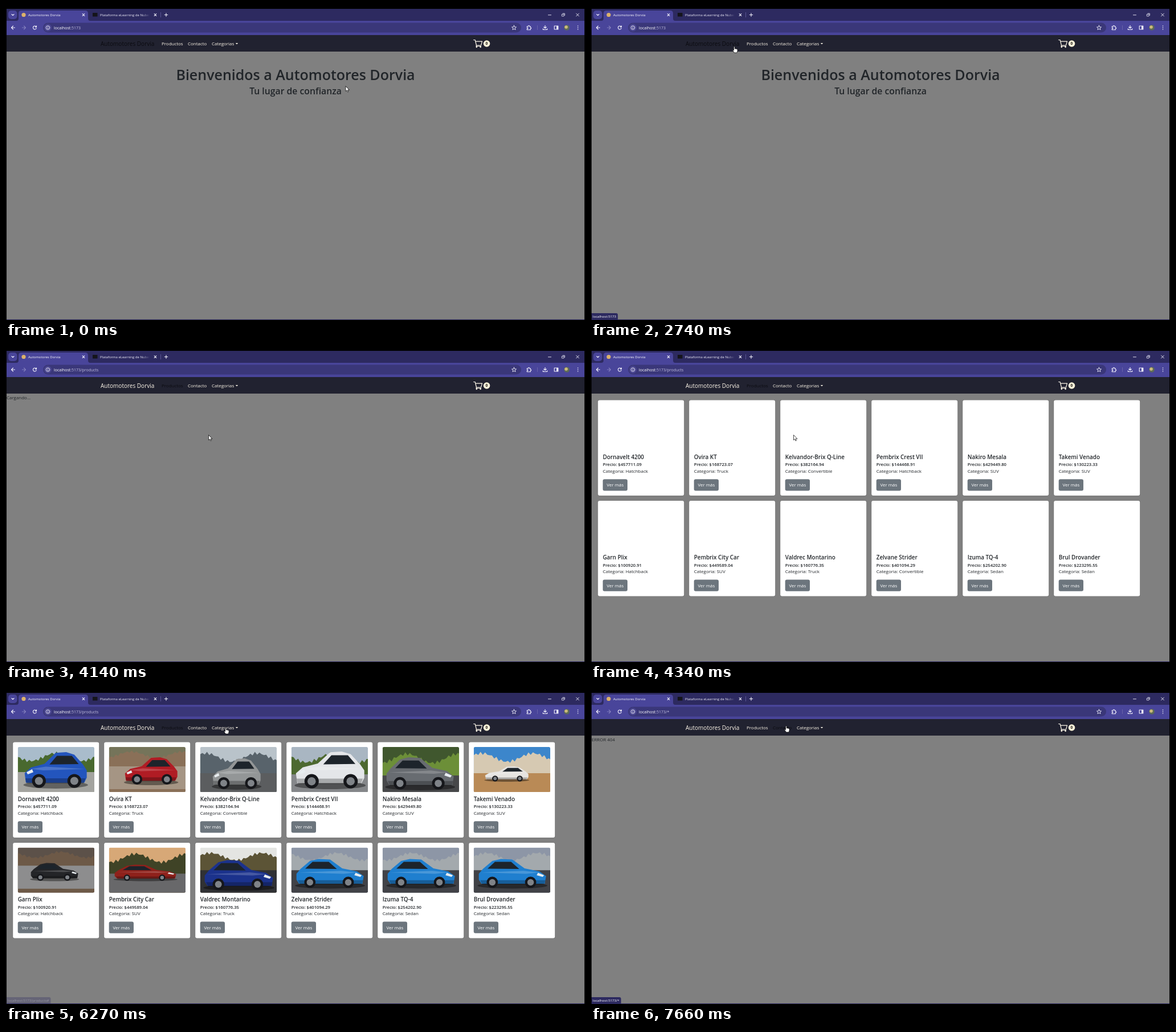
An HTML page with a canvas for the animation above (8 s loop, 1016 by 551 pixels).

```html
<!DOCTYPE html>
<html lang="es">
<head>
<meta charset="utf-8">
<style>
  html, body { margin: 0; width: 100%; height: 100%; overflow: hidden; background: #000; }
  canvas { display: block; }
</style>
</head>
<body>
<canvas id="stage" width="1016" height="551"></canvas>
<script>
const ctx = document.getElementById('stage').getContext('2d');
const LOOP = 8000, TICK = 200 / 3;
const BRAND = 'Automotores Dorvia';
const CREAM = '#fdf6e8', DARK = '#0b0b10', INK = '#212529', PURPLE = '#49459a', STRIP = '#2d2a60';

// name, price, category
const cars = [
  ['Dornavelt 4200', '457711.09', 'Hatchback'],
  ['Ovira KT', '168723.07', 'Truck'],
  ['Kelvandor-Brix Q-Line', '382164.94', 'Convertible'],
  ['Pembrix Crest VII', '144468.91', 'Hatchback'],
  ['Nakiro Mesala', '429449.80', 'SUV'],
  ['Takemi Venado', '130223.33', 'SUV'],
  ['Garn Plix', '100920.91', 'Hatchback'],
  ['Pembrix City Car', '449589.04', 'SUV'],
  ['Valdrec Montarino', '160776.35', 'Truck'],
  ['Zelvane Strider', '401094.29', 'Convertible'],
  ['Izuma TQ-4', '254202.90', 'Sedan'],
  ['Brul Drovander', '223295.55', 'Sedan']
];

// sky, backdrop, ground, body, left, top, width, height, horizon, facing
const photos = [
  ['#a9bccb', '#49692f', '#a3a39f', '#2355bd', 12, 9, 109, 64, 44, -1],
  ['#75745a', '#8a7058', '#a59584', '#b01c24', 28, 18, 92, 49, 34, -1],
  ['#b9c3ca', '#58636b', '#5b5d5f', '#939697', 22, 20, 84, 55, 46, -1],
  ['#a9b6c2', '#4d6930', '#85878a', '#e4e6e9', 8, 8, 120, 66, 48, -1],
  ['#40572e', '#6c8f38', '#47484a', '#686c71', 7, 18, 118, 58, 50, 1],
  ['#3c86cb', '#d6c9b2', '#b98a56', '#e6e4e1', 20, 34, 76, 27, 46, -1],
  ['#5c5149', '#6d5947', '#8d8d8e', '#242528', 23, 27, 83, 32, 32, 1],
  ['#d7a877', '#3f4326', '#68686a', '#8f211b', 10, 30, 108, 29, 46, 1],
  ['#e4e5e2', '#5c5436', '#303134', '#1b328c', 8, 22, 120, 54, 40, 1],
  ['#8d96a6', '#a3a9ad', '#414247', '#1f7fcf', 9, 20, 118, 52, 40, 1]
];

// tick, x, y of the pointer tip
const track = [
  [1, 596, 141], [4, 562, 166], [7, 450, 176], [11, 275, 112], [14, 213, 77], [16, 206, 63],
  [31, 206, 63], [36, 235, 74], [40, 235, 74], [41, 251.5, 71], [46, 290, 67],
  [53, 290, 67], [56, 310, 100], [60, 350, 148], [62, 355.5, 153],
  [80, 355.5, 153], [84, 362, 132], [89, 381, 78], [92, 385.5, 66],
  [103, 385.5, 66], [108, 342.5, 63], [120, 342.5, 63]
];

function box(x, y, w, h, color, r = 0) {
  ctx.fillStyle = color;
  ctx.beginPath();
  ctx.roundRect(x, y, w, h, r);
  ctx.fill();
}

function disc(x, y, r, color) {
  ctx.fillStyle = color;
  ctx.beginPath();
  ctx.arc(x, y, r, 0, 7);
  ctx.fill();
}

function text(str, x, y, size, color, weight = 400, align = 'left') {
  ctx.font = `${weight} ${size}px "Open Sans", "Noto Sans", sans-serif`;
  ctx.textAlign = align;
  ctx.fillStyle = color;
  ctx.fillText(str, x, y);
  return ctx.measureText(str).width;
}

function shape(d, x, y, fill, stroke, width = 1) {
  const path = new Path2D(d);
  ctx.save();
  ctx.translate(x, y);
  ctx.lineCap = ctx.lineJoin = 'round';
  ctx.lineWidth = width;
  if (fill) { ctx.fillStyle = fill; ctx.fill(path); }
  if (stroke) { ctx.strokeStyle = stroke; ctx.stroke(path); }
  ctx.restore();
}

const icon = (d, x, y, width = 1.1, color = '#f2f1fc') => shape(d, x, y, null, color, width);

function drawBrowser(path) {
  box(0, 0, 1016, 551, '#000');
  box(1, 5, 1014, 22, STRIP);
  box(1, 26, 1014, 25, PURPLE);
  box(4, 8, 15.5, 15, PURPLE, 5);
  icon('M-2-1L0 1 2-1', 12, 15.5);
  shape('M-4 18Q0 18 0 14V5Q0 0 5 0H117Q122 0 122 5V14Q122 18 126 18Z', 22, 8, PURPLE);

  disc(31, 15.5, 3.6, '#dcb26a');
  text(BRAND, 39, 17.8, 6, '#fff');
  box(152, 12, 8.5, 6.5, '#15151b');
  const fade = ctx.createLinearGradient(238, 0, 252, 0);
  fade.addColorStop(0, '#f0effa');
  fade.addColorStop(1, '#f0effa00');
  text('Plataforma eLearning de Nubel', 165, 17.8, 6, fade);
  for (const x of [136, 262]) icon('M-1.8-1.8L1.8 1.8M1.8-1.8L-1.8 1.8', x, 15.5);
  box(271, 11, 0.8, 9, '#6561a0');
  icon('M-2.7 0H2.7M0-2.7V2.7', 281, 15.5);

  icon('M-2.5 0H2.5', 954, 15.8, 0.9);
  icon('M-2.3-1H1V2.3H-2.3ZM-1-2.4H2.4V1', 978, 15.5, 0.8);
  icon('M-2.4-2.4L2.4 2.4M2.4-2.4L-2.4 2.4', 1003, 15.5, 0.9);

  icon('M3 0H-3M0-3L-3 0 0 3', 12.5, 38);
  icon('M-3 0H3M0-3L3 0 0 3', 31.5, 38, 1.1, '#827fbd');
  icon('M2.6-1.5A3 3 0 1 0 2.8 1M3-3.3V-1.1H.8', 50.5, 38);
  box(65, 29.5, 839, 17, '#3a3779', 8.5);
  disc(73.5, 38, 6.5, '#4a4690');
  icon('M3.3 0A3.3 3.3 0 1 1-3.3 0A3.3 3.3 0 1 1 3.3 0M0 0V1.6M0-1.6V-1.5', 73.5, 38, 0.9);
  const hostWidth = text('localhost', 84, 40.6, 6.97, '#fff');
  text(':5173' + path, 84 + hostWidth, 40.6, 6.97, '#c0bedf');

  icon('M0-3.9L1.1-1.2 4-1 1.8.9 2.5 3.7 0 2.2-2.5 3.7-1.8.9-4-1-1.1-1.2Z', 891.5, 38, 0.9);
  icon('M-3.2-2.2H-1Q-1-3.8 0-3.8T1-2.2H2.8V-.2Q4.2-.2 4.2.8T2.8 1.8V3.8H-3.2V1.8Q-1.6 1.8-1.6.8T-3.2-.2Z', 917.5, 38);
  box(932, 34, 0.8, 8, '#716dae');
  icon('M0-3.6V1M-2.2-1L0 1.2 2.2-1M-3.6 1.8V3.5H3.6V1.8', 946, 38, 1.2);
  icon('M-3.3-3H3.3V3H-3.3Z', 965.5, 38);
  box(966, 35, 3, 6, '#f2f1fc');
  disc(984, 38, 4.8, '#5d6b58');
  disc(983, 37, 2.8, '#cdbb7c');
  for (const dy of [-3, 0, 3]) disc(1003.5, 38 + dy, 0.8, '#f2f1fc');
}

function drawNav(active) {
  box(1, 51, 1014, 29.5, '#212230');
  const tint = on => on ? DARK : CREAM;
  text(BRAND, 166, 69.7, 10, tint(active.home));
  text('Productos', 273, 68.7, 7.95, tint(active.products));
  text('Contacto', 319, 68.7, 7.95, tint(active.contact));
  text('Categorias', 361, 68.7, 7.95, CREAM);
  shape('M0 0H4.4L2.2 2.3Z', 402.8, 65, CREAM);
  icon('M0 0H2.6L5 9.5H13L15 2.6H3.2M5 9.5L4.5 11H13', 820.5, 59.5, 1.2, CREAM);
  for (const x of [825.8, 832.6]) disc(x, 72, 1.3, CREAM);
  disc(843.5, 66, 5.8, '#fff5d9');
  text('0', 843.5, 68.4, 6.6, '#111', 700, 'center');
}

function drawCar(body, x, y, w, h, facing) {
  ctx.save();
  ctx.translate(x + w / 2, y);
  ctx.scale(facing, 1);
  ctx.translate(-w / 2, 0);
  const poly = (color, ...p) => {
    ctx.fillStyle = color;
    ctx.beginPath();
    p.forEach(([u, v]) => ctx.lineTo(u * w, v * h));
    ctx.fill();
  };
  ctx.fillStyle = '#0006';
  ctx.beginPath();
  ctx.ellipse(w / 2, h * .9, w * .52, h * .1, 0, 0, 7);
  ctx.fill();
  poly(body, [0, .5], [.06, .34], [.2, .07], [.33, 0], [.5, .02], [.68, .32], [.9, .42],
    [1, .58], [.98, .84], [.04, .84], [0, .7]);
  poly('#1d242b', [.13, .33], [.24, .1], [.48, .1], [.6, .34]);
  poly('#ffffff30', [.03, .46], [.66, .4], [.9, .46], [.7, .5]);
  poly('#0004', [.02, .72], [.99, .72], [.97, .86], [.05, .86]);
  poly('#e8edf0', [.88, .47], [.97, .55], [.95, .61], [.86, .55]);
  for (const u of [.2, .77]) {
    disc(u * w, h * .79, h * .19, '#15161a');
    disc(u * w, h * .79, h * .11, '#7f8388');
  }
  ctx.restore();
}

function drawPhoto(index, x, y) {
  const [sky, back, ground, body, cx, cy, cw, ch, horizon, facing] = photos[Math.min(index, 9)];
  ctx.save();
  ctx.beginPath();
  ctx.roundRect(x, y, 134.3, 79, 2.5);
  ctx.clip();
  ctx.translate(x, y);
  box(0, 0, 135, 80, sky);
  ctx.fillStyle = back;
  ctx.beginPath();
  ctx.moveTo(0, 80);
  for (let u = 0; u <= 136; u += 4)
    ctx.lineTo(u, horizon * (.4 + .16 * Math.sin(u * .07 + index * 2) + .06 * Math.sin(u * .9)));
  ctx.lineTo(136, 80);
  ctx.fill();
  const floor = ctx.createLinearGradient(0, horizon, 0, 80);
  floor.addColorStop(0, ground);
  floor.addColorStop(1, ground + 'd0');
  box(0, horizon, 135, 40, ground);
  box(0, horizon, 135, 40, floor);
  drawCar(body, cx, cy, cw, ch, facing);
  ctx.restore();
}

function drawCards(loaded) {
  cars.forEach(([name, price, category], i) => {
    const x = 11.7 + i % 6 * 160, y = 91 + Math.floor(i / 6) * 176.4, left = x + 9;
    box(x, y, 152, 168.5, '#6f6f6f', 3.5);
    box(x + .5, y + .5, 151, 167.5, '#fff', 3);
    if (loaded) drawPhoto(i, left, y + 9);
    text(name, left, y + 103.7, 9.9, INK, 600);
    text('Precio: $' + price, left, y + 116.4, 7.65, INK, 600);
    text('Categoria: ' + category, left, y + 127.6, 8, INK);
    box(left, y + 139.2, 43.3, 20.2, '#6c757d', 3);
    text('Ver más', left + 21.6, y + 152.3, 7.9, '#fff', 400, 'center');
  });
}

function drawStatus(n) {
  let path, alpha = 1;
  if (n >= 107) path = '/*';
  else if (n >= 94) [path, alpha] = ['/products#', Math.min(1, (n - 93) / 3)];
  else if (n >= 45 && n < 58) path = '/products';
  else if (n >= 19 && n < 45) [path, alpha] = ['', Math.min(1, (n - 18) / 2)];
  else return;
  const label = 'localhost:5173' + path;
  ctx.globalAlpha = alpha;
  ctx.font = '400 6.1px "Open Sans", "Noto Sans", sans-serif';
  box(1, 539, ctx.measureText(label).width + 5, 11, STRIP, [0, 3, 0, 0]);
  text(label, 3, 547, 6.1, '#fff');
  ctx.globalAlpha = 1;
}

function drawPointer(n) {
  const i = Math.max(1, track.findIndex(key => key[0] >= n));
  const [t0, x0, y0] = track[i - 1], [t1, x1, y1] = track[i];
  const k = Math.max(0, (n - t0) / (t1 - t0));
  const x = x0 + (x1 - x0) * k, y = y0 + (y1 - y0) * k;
  if (n >= 47 && n < 50 || n >= 111 && n < 114) disc(x, y, 6, '#c3b010d8');
  const hand = n >= 15 && n < 55 || n >= 90;
  shape(hand
    ? 'M-.9 6V1Q-.9 0 0 0T.9 1V4Q3 3.5 5.6 5V7.5Q5.4 9 4.6 11H0L-2.8 7Q-2.5 5.6-.9 6.6Z'
    : 'M0 0V8.6L2 6.8 3.5 10 4.9 9.4 3.5 6.3H6.1Z', x, y, '#fff', '#000', 0.7);
}

function draw(now) {
  const n = Math.floor((now % LOOP + 14) / TICK) % 120;
  const page = n < 48 ? 'home' : n < 113 ? 'products' : 'error';
  drawBrowser({ home: '', products: '/products', error: '/*' }[page]);
  drawNav({ home: page === 'home', products: n >= 47 && n < 113, contact: n >= 111 });
  box(1, 80, 1014, 470, '#808080');
  box(1, 550, 1014, 1, '#29265c');

  if (page === 'home') {
    text('Bienvenidos a ' + BRAND, 508, 129.8, 25, INK, 600, 'center');
    text('Tu lugar de confianza', 508, 154.6, 15.75, INK, 600, 'center');
  } else if (page === 'error') text('ERROR 404', 1, 89.8, 7.95, INK);
  else if (n < 65) text('Cargando...', 1, 89.8, 7.95, INK);
  else drawCards(n >= 93);

  drawStatus(n);
  drawPointer(n);
}

const start = performance.now();
(function loop() {
  draw(performance.now() - start);
  requestAnimationFrame(loop);
})();
</script>
</body>
</html>
```
